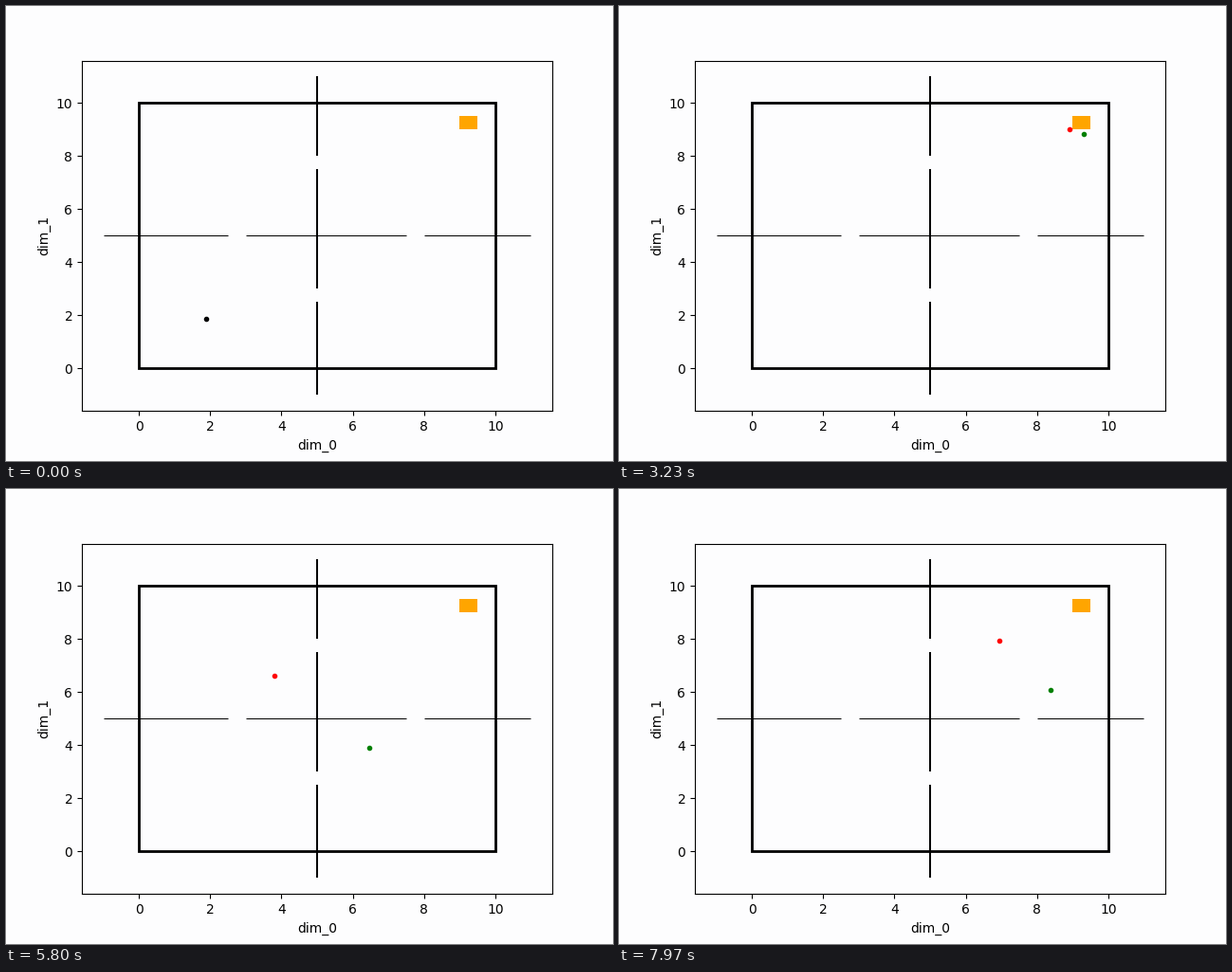
These frames come from a looping animation (640 px wide and 480 px high, 8000 ms). A matplotlib script:

```python
import numpy as np
import matplotlib.pyplot as plt
from matplotlib.animation import FuncAnimation
from matplotlib.patches import Rectangle

LOOP_MS = 8000
TICK_MS = 20
STEP_MS = 100 / 3
PX = 0.72  # one pixel in points at 100 dpi
PAPER = "#fdfdfe"

# Each run: its first step and the point both walkers leave from
RUNS = [(0, 1.89, 1.86), (49, 1.98, 1.92), (99, 1.65, 1.9),
        (151, 1.8, 1.9), (202, 1.95, 2.03)]

# Routes through the two pairs of doors to the goal: (step, x, y)
UPPER = [(5, 1.55, 3.05), (14, 2.62, 4.85), (22, 3.63, 6.43), (30, 5.2, 7.9),
         (34, 6.16, 8.07), (37, 6.93, 7.96), (46, 8.9, 9.03)]
LOWER = [(5, 2.8, 1.35), (14, 4.75, 2.55), (22, 6.29, 3.75), (30, 7.6, 4.9),
         (34, 8.23, 5.67), (37, 8.37, 6.1), (46, 9.08, 8.1), (48, 9.32, 8.82)]


def along(route, origin, step):
    """Point at a step on a smooth curve from the origin along the route."""
    knots = np.array([(0, *origin)] + route, float)
    keys, pts = knots[:, 0], knots[:, 1:]
    slopes = np.gradient(pts, keys, axis=0)
    t = min(step, keys[-1])
    i = min(np.searchsorted(keys, t, side="right"), len(keys) - 1) - 1
    h = keys[i + 1] - keys[i]
    u = (t - keys[i]) / h
    return ((1 + 2 * u) * (1 - u) ** 2 * pts[i]
            + u * (1 - u) ** 2 * h * slopes[i]
            + u ** 2 * (3 - 2 * u) * pts[i + 1]
            + u ** 2 * (u - 1) * h * slopes[i + 1])


fig, ax = plt.subplots(figsize=(6.4, 4.8), dpi=100, facecolor=PAPER)
ax.set_facecolor(PAPER)
ax.set(xlim=(-1.6, 11.6), ylim=(-1.6, 11.6), xlabel="dim_0", ylabel="dim_1")
ax.set_xticks(range(0, 11, 2))
ax.set_yticks(range(0, 11, 2))

ax.add_patch(Rectangle((0, 0), 10, 10, fill=False, ec="black", lw=2))
ax.add_patch(Rectangle((9, 9), 0.5, 0.5, fc="orange", ec="none"))
for a, b in [(-1, 2.5), (3, 7.5), (8, 11)]:
    ax.plot([5, 5], [a, b], color="black", lw=2 * PX, solid_capstyle="butt")
    ax.plot([a, b], [5, 5], color="black", lw=PX, solid_capstyle="butt")

red, green, black = dots = [
    ax.plot([], [], ".", color=color)[0] for color in ("red", "green", "black")]


def update(tick):
    # Steps do not fall on whole ticks: show a step in the tick where it begins
    now = int((tick * TICK_MS + 0.75 * TICK_MS) / STEP_MS)
    first, *origin = [run for run in RUNS if run[0] <= now][-1]
    step = now - first
    places = along(UPPER, origin, step), along(LOWER, origin, step), origin
    for dot, (x, y) in zip(dots, places):
        dot.set_data([x], [y])
        dot.set_visible((dot is black) == (step == 0))
    return dots


anim = FuncAnimation(fig, update, frames=LOOP_MS // TICK_MS, interval=TICK_MS,
                     init_func=lambda: update(0), repeat=True, repeat_delay=0)
plt.show()
```
